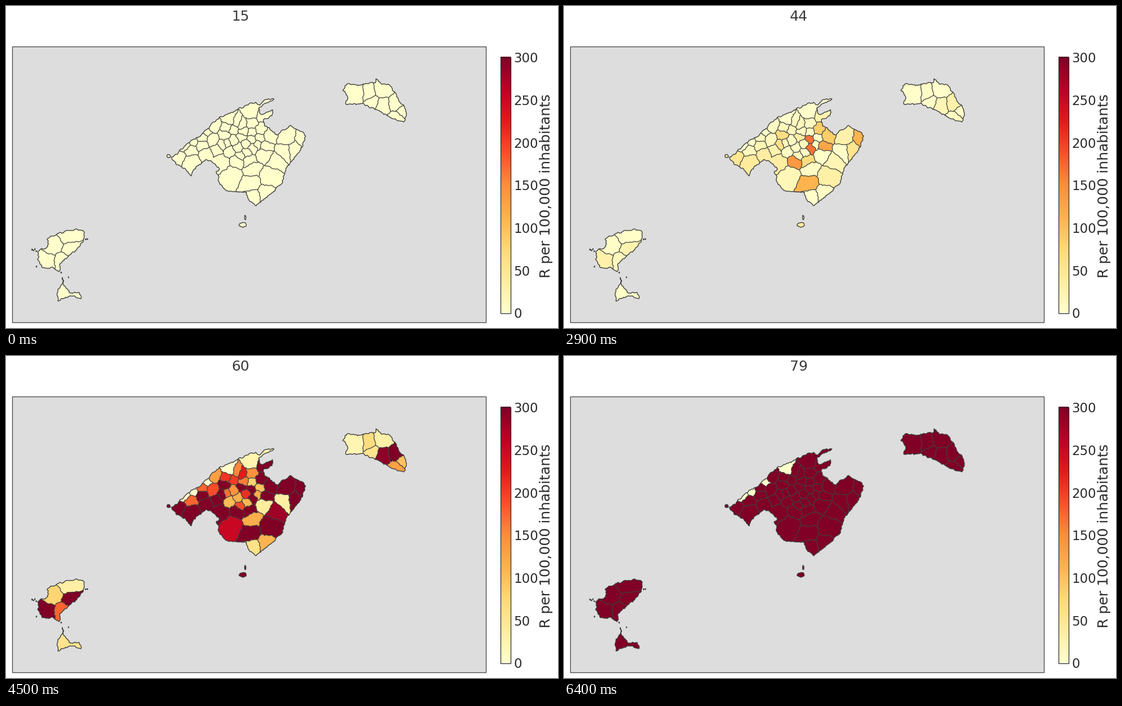
A matplotlib script that plays this animation: 980x572 px, repeating every 6500 ms.

```python
import numpy as np
import matplotlib.pyplot as plt
from matplotlib.animation import FuncAnimation
from matplotlib.collections import LineCollection, PolyCollection
from matplotlib.patches import Polygon, Rectangle
from matplotlib.path import Path

W, H, DPI = 980, 572, 100
FRAMES, INTERVAL, FIRST_DAY = 65, 100, 15
VMAX = 300
INK, DARK = "#404040", "#2b2b2b"

plt.rcParams["font.family"] = "DejaVu Sans"
cmap = plt.get_cmap("YlOrRd")
rng = np.random.default_rng(7)

# Key points of the coasts; the detail between them is made by rough()
MAIN = [
    (294, 268), (320, 246), (350, 225), (374, 202), (394, 192), (417, 181),
    (443, 171), (451, 176), (463, 166), (476, 165), (449, 181), (452, 192),
    (473, 184), (472, 195), (457, 202), (459, 213), (481, 229), (495, 220),
    (505, 212), (525, 223), (532, 231), (527, 248), (515, 266), (497, 288),
    (489, 316), (470, 334), (444, 355), (429, 340), (427, 331), (412, 330),
    (393, 328), (380, 317), (373, 295), (379, 290), (368, 279), (354, 273),
    (333, 291), (329, 302), (317, 288), (303, 282)]
WEST = [(57, 436), (74, 427), (73, 414), (92, 404), (104, 401), (125, 396),
        (139, 402), (136, 420), (122, 437), (103, 452), (97, 457), (94, 472),
        (83, 464), (65, 465), (56, 450)]
SOUTH = [(100, 482), (103, 497), (114, 510), (130, 509), (133, 520),
         (115, 515), (92, 524), (92, 505), (101, 493)]
EAST = [(598, 150), (605, 139), (636, 139), (656, 136), (657, 129), (667, 139),
        (678, 139), (692, 155), (704, 175), (710, 188), (706, 206), (686, 200),
        (656, 184), (632, 173), (604, 175), (606, 160)]

# Towns: rate on day 56, then one or two cell centres
CITY, CAPE = 270, 357
MAIN_TOWNS = [
    (CAPE, 306, 267), (300, 330, 275), (CITY, 354, 263, 383, 275),
    (0, 319, 246), (0, 332, 240), (0, 356, 222), (0, 398, 203),
    (90, 329, 256), (160, 347, 247), (90, 348, 234), (98, 367, 238),
    (68, 368, 213), (195, 375, 255), (480, 389, 230), (440, 384, 247),
    (12.5, 437, 188, 463, 171), (180, 457, 194), (255, 419, 233),
    (1000, 411, 273), (500, 432, 274), (1200, 437, 251), (1200, 436, 237),
    (620, 466, 231), (620, 451, 221), (900, 459, 249), (21, 457, 262),
    (210, 497, 234), (800, 530, 238), (390, 510, 255), (17, 495, 257),
    (145, 479, 276), (230, 467, 303), (60, 437, 289), (130, 402, 300),
    (800, 435, 314), (30, 438, 340), (57, 462, 334)]
WEST_TOWNS = [(41, 85, 426), (17, 110, 408), (180, 114, 433), (220, 74, 452),
              (90, 101, 453)]
EAST_TOWNS = [(11.5, 626, 156), (35, 642, 156), (28, 650, 171), (16, 668, 150),
              (150, 668, 177), (205, 694, 174), (50, 704, 189), (67, 696, 199)]


def small_towns(towns, n, x, y, radius):
    """Fill the disc with n towns, each as far as possible from the others."""
    centres = [t[1:3] for t in towns]
    out = []
    for _ in range(n):
        r, a = radius * np.sqrt(rng.random(80)), rng.uniform(0, 2 * np.pi, 80)
        tries = np.c_[x + r * np.cos(a), y + r * np.sin(a)]
        gaps = np.linalg.norm(tries[:, None] - np.array(centres), axis=2)
        best = tuple(tries[gaps.min(1).argmax()])
        centres.append(best)
        out.append((65 * np.exp(rng.normal(0, 0.35)), *best))
    return out


def blob(x, y, rx, ry, n=9):
    a = np.linspace(0, 2 * np.pi, n, endpoint=False)
    r = rng.uniform(0.5, 1.2, n)
    return list(zip(x + rx * r * np.cos(a), y + ry * r * np.sin(a)))


def rough(p, q, rng, amp):
    """Jagged line from p to q by midpoint displacement."""
    pts = [np.array(p, float), np.array(q, float)]
    while np.hypot(*(pts[1] - pts[0])) > 3.2:
        new = [pts[0]]
        for a, b in zip(pts, pts[1:]):
            d = b - a
            size = np.hypot(*d) + 1e-9
            shift = rng.uniform(-1, 1) * min(amp * size, 1.6)
            new += [(a + b) / 2 + shift * np.array([-d[1], d[0]]) / size, b]
        pts = new
    return pts


def rough_ring(points, amp):
    ring = []
    for p, q in zip(points, points[1:] + points[:1]):
        ring += rough(p, q, rng, amp)[:-1]
    return np.array(ring)


def cut(cell, here, there, label):
    """Keep the part of the cell that is nearer to here than to there."""
    n = there - here
    c = n @ (here + there) / 2
    out = []
    for (p, tag), (q, _) in zip(cell, cell[1:] + cell[:1]):
        fp, fq = n @ p - c, n @ q - c
        if fp <= 0:
            out.append((p, tag))
        if (fp <= 0) != (fq <= 0):
            x = p + (q - p) * fp / (fp - fq)
            out.append((x, label if fp <= 0 else tag))
    return out


def build_cells(coast, towns):
    """Nearest-centre cells, the rate of each and the lines between towns."""
    seeds, owner = [], []
    for k, (_, *xy) in enumerate(towns):
        for x, y in zip(xy[::2], xy[1::2]):
            seeds.append(np.array([x, y], float))
            owner.append(k)
    (x0, y0), (x1, y1) = coast.min(0) - 5, coast.max(0) + 5
    box = [(np.array(p), None) for p in ((x0, y0), (x1, y0), (x1, y1), (x0, y1))]
    cells, borders = [], []
    for i, here in enumerate(seeds):
        cell = box
        for j, there in enumerate(seeds):
            if j != i:
                cell = cut(cell, here, there, j)
        outline = []
        for (p, j), (q, _) in zip(cell, cell[1:] + cell[:1]):
            if j is None or owner[i] == owner[j]:
                line = [p, q]
            else:
                # both neighbours get the same jagged edge
                edge = np.random.default_rng(1000 * min(i, j) + max(i, j))
                if i < j:
                    line = rough(p, q, edge, 0.22)
                    borders.append(line)
                else:
                    line = rough(q, p, edge, 0.22)[::-1]
            outline += line[:-1]
        cells.append(np.array(outline))
    return cells, np.array([towns[k][0] for k in owner], float), borders


def growth(day):
    """Growth since day 56, a little slower after day 64."""
    t = day - 56
    return np.exp(0.165 * min(t, 8) + 0.135 * max(t - 8, 0))


fig = plt.figure(figsize=(W / DPI, H / DPI), dpi=DPI, facecolor="white")
ax = fig.add_axes([0, 0, 1, 1])
ax.add_patch(Rectangle((10.5, 71.5), 841, 490, fc="#dddddd", ec=INK, lw=0.9))

MAIN_TOWNS += small_towns(MAIN_TOWNS, 16, 418, 236, 33)
islands = [(MAIN, MAIN_TOWNS), (WEST, WEST_TOWNS), (SOUTH, [(28, 110, 510)]),
           (EAST, EAST_TOWNS), (blob(289, 267, 4, 3), [(CAPE, 289, 267)]),
           (blob(420, 388, 6, 5), [(CITY, 420, 388)]),
           (blob(424.5, 376, 2, 5), [(CITY, 424, 376)])]

layers = []
for points, towns in islands:
    coast = rough_ring(points, 0.24)
    cells, rates, borders = build_cells(coast, towns)
    fill = PolyCollection(cells, edgecolors="face", linewidths=0.6, zorder=2)
    lines = LineCollection(borders, colors=INK, linewidths=0.9, zorder=3)
    for part in (fill, lines):
        ax.add_collection(part, autolim=False)
        part.set_clip_path(Path(coast), ax.transData)
    ax.add_patch(Polygon(coast, fill=False, ec=INK, lw=1, zorder=4))
    layers.append((fill, rates))

# Rocks near the western islands: cluster centre, spread, count
for cx, cy, spread, n in [(50, 434, 5, 4), (143, 415, 3, 2), (54, 462, 1, 1),
                          (98, 474, 1, 1), (111, 482, 1, 1)]:
    for k in range(n):
        x = cx + spread * (2 * (k + 0.5) / n - 1)
        ax.add_patch(Polygon(blob(x, cy + rng.uniform(-2, 2), 1.3, 1.6, 5),
                             fc=INK, ec=INK, lw=0.5, zorder=4))

# Colour bar
TOP, BOTTOM, LEFT, RIGHT = 91, 545.5, 877.5, 895.5
ax.imshow(np.linspace(1, 0, 256)[:, None], cmap=cmap, aspect="auto",
          interpolation="nearest", extent=(LEFT, RIGHT, BOTTOM, TOP), zorder=2)
ax.add_patch(Rectangle((LEFT, TOP), RIGHT - LEFT, BOTTOM - TOP,
                       fill=False, ec=DARK, lw=0.9, zorder=3))
for v in range(0, VMAX + 1, 50):
    y = BOTTOM + (TOP - BOTTOM) * v / VMAX
    ax.text(901, y + 9, str(v), size=16.5, color=DARK, va="baseline")
ax.text(966, 320, "R per 100,000 inhabitants", size=18, color=DARK,
        rotation=90, rotation_mode="anchor", ha="center", va="baseline")
title = ax.text(416.5, 26.5, "", size=18, color="#3a3a3a",
                ha="center", va="baseline")

ax.set_xlim(0, W)
ax.set_ylim(H, 0)
ax.axis("off")


def draw(i):
    day = FIRST_DAY + i
    title.set_text(str(day))
    for fill, rates in layers:
        fill.set_facecolor(cmap(np.clip(rates * growth(day) / VMAX, 0, 1)))
    return [title] + [fill for fill, _ in layers]


anim = FuncAnimation(fig, draw, frames=FRAMES, interval=INTERVAL,
                     repeat=True, repeat_delay=0, blit=False)
plt.show()
```
